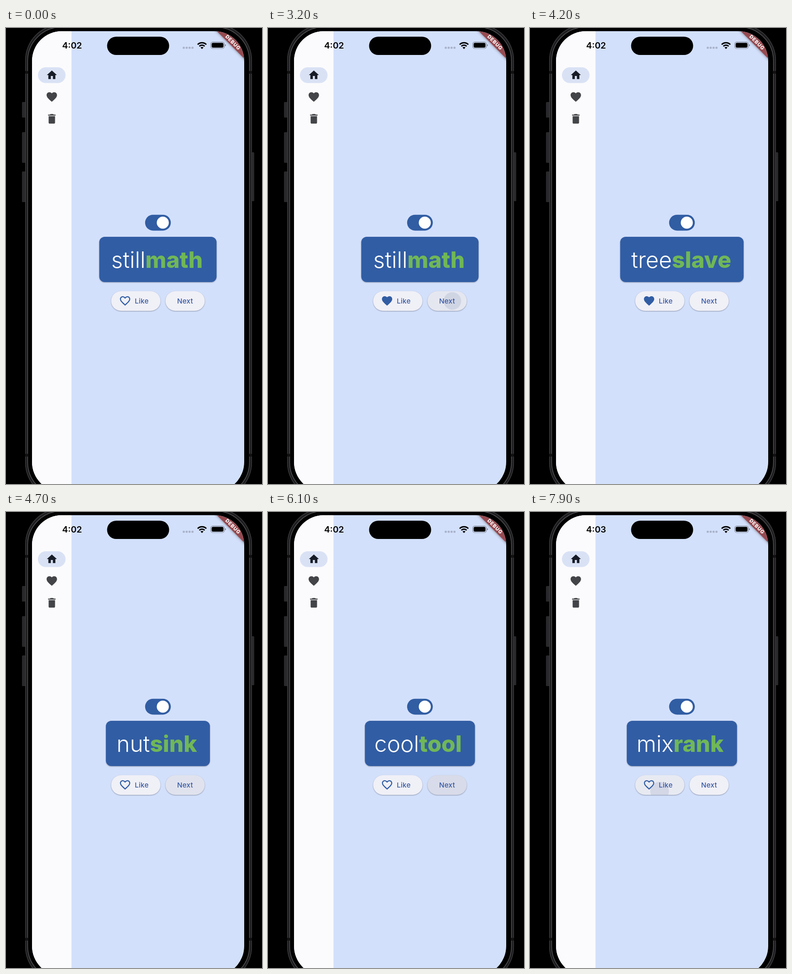
Animation of 561 by 998 pixels, one loop 8 s. Source, as an HTML page:

```html
<!DOCTYPE html>
<html lang="en">
<head>
<meta charset="utf-8">
<title>Word pairs</title>
<style>
html, body { margin: 0; width: 100%; height: 100%; overflow: hidden; background: #000; }
svg { display: block; width: 561px; height: 998px; font-family: Inter, "Liberation Sans", sans-serif; }
.word { font-size: 49.5px; }
.label { font-size: 15.2px; font-weight: 500; letter-spacing: .2px; fill: #3658a5; }
.raised { filter: drop-shadow(0 1.5px 1.3px rgba(40, 45, 60, .42)); }
.rim { fill: none; stroke-width: 1.4; }
</style>
</head>
<body>
<svg viewBox="0 0 561 998">
  <defs>
    <clipPath id="screen"><rect x="57" y="7" width="465" height="1008" rx="65"/></clipPath>
    <clipPath id="cardClip"><rect id="cardMask" y="457" height="99" rx="12"/></clipPath>
    <clipPath id="likeClip"><rect x="230.5" y="576" width="108" height="43" rx="21.5"/></clipPath>
    <clipPath id="nextClip"><rect x="349.5" y="576" width="86" height="43" rx="21.5"/></clipPath>
    <path id="heart" d="M12 21.35l-1.45-1.32C5.4 15.36 2 12.28 2 8.5 2 5.42 4.42 3 7.5 3c1.74 0 3.41.81 4.5 2.09C13.09 3.81 14.76 3 16.5 3 19.58 3 22 5.42 22 8.5c0 3.78-3.4 6.86-8.55 11.54z"/>
  </defs>

  <!-- phone body -->
  <rect width="561" height="998"/>
  <g fill="#29292b">
    <rect x="35" y="162" width="8" height="34" rx="1.5"/>
    <rect x="35" y="228" width="8" height="67" rx="1.5"/>
    <rect x="35" y="314" width="8" height="67" rx="1.5"/>
    <rect x="537" y="272" width="7" height="107" rx="1.5"/>
  </g>
  <rect x="42" y="-8" width="497" height="1038" rx="79" fill="#1d1d1f"/>
  <rect class="rim" x="42.7" y="-7.3" width="495.6" height="1036.6" rx="78" stroke="#3c3c3e"/>
  <rect x="47.5" y="-2" width="486" height="1026" rx="74"/>
  <rect class="rim" x="47.5" y="-2" width="486" height="1026" rx="74" stroke="#565658"/>
  <g fill="#111">
    <rect x="42" y="94" width="6" height="6"/><rect x="533" y="94" width="6" height="6"/>
    <rect x="42" y="932" width="6" height="6"/><rect x="533" y="932" width="6" height="6"/>
  </g>

  <g clip-path="url(#screen)">
    <rect x="57" y="7" width="465" height="991" fill="#d3e0fb"/>
    <rect x="57" y="7" width="86.5" height="991" fill="#fbfbfd"/>

    <!-- navigation rail -->
    <rect x="70" y="86" width="60.5" height="34.5" rx="17.2" fill="#d9e2f5"/>
    <path transform="translate(87.3 89.7) scale(1.1)" fill="#171c26" d="M10 20v-6h4v6h5v-8h3L12 3 2 12h3v8z"/>
    <use href="#heart" transform="translate(86.7 137.2) scale(1.14)" fill="#434447"/>
    <path transform="translate(86.4 184.8) scale(1.17)" fill="#434447" d="M6 19c0 1.1.9 2 2 2h8c1.1 0 2-.9 2-2V7H6v12zM19 4h-3.5l-1-1h-5l-1 1H5v2h14V4z"/>

    <!-- status bar -->
    <text id="clock" x="123" y="45.3" font-size="19.2" font-weight="600"></text>
    <rect x="221.5" y="19" width="136" height="40" rx="20"/>
    <g fill="#a9b3ca">
      <rect x="387.2" y="41" width="4.6" height="4.6" rx="1.5"/>
      <rect x="393.6" y="41" width="4.6" height="4.6" rx="1.5"/>
      <rect x="400" y="41" width="4.6" height="4.6" rx="1.5"/>
      <rect x="406.4" y="41" width="4.6" height="4.6" rx="1.5"/>
    </g>
    <g fill="none" stroke="#000" stroke-width="3">
      <path d="M420 36.2a13.3 13.3 0 0 1 19 0"/>
      <path d="M423.7 40a8 8 0 0 1 11.6 0"/>
    </g>
    <path d="M429.5 46l-3.2-3.3a4.6 4.6 0 0 1 6.4 0z"/>
    <rect x="448.6" y="30.6" width="30" height="14.4" rx="4.6" fill="none" stroke="#7c8494" stroke-width="1.2"/>
    <rect x="450.6" y="32.6" width="26" height="10.4" rx="2.9"/>
    <path d="M480 35.5q2 .5 2 2.3t-2 2.3z" fill="#7c8494"/>

    <!-- corner banner -->
    <g transform="translate(497.5 31.5) rotate(45)">
      <rect x="-60" y="-7.8" width="120" height="15.6" fill="#964a50" style="filter:drop-shadow(0 0 3px rgba(0,0,0,.45))"/>
      <text y="3.9" text-anchor="middle" font-size="10.8" font-weight="800" letter-spacing=".9" fill="#fff">DEBUG</text>
    </g>

    <!-- switch -->
    <rect x="304.8" y="408.8" width="56.4" height="34.6" rx="17.3" fill="#315da3"/>
    <circle cx="343.6" cy="426" r="13.2" fill="#fffffd"/>

    <!-- word card -->
    <rect id="card" class="raised" y="457" height="99" rx="12" fill="#315da4"/>
    <g class="word" clip-path="url(#cardClip)">
      <text id="first" y="524.5" text-anchor="end" font-weight="300" fill="#fff"></text>
      <text id="second" y="524.5" font-weight="800" fill="#70b757"></text>
    </g>

    <!-- buttons -->
    <rect class="raised" x="230.5" y="576" width="108" height="43" rx="21.5" fill="#f0f0f7"/>
    <rect class="raised" x="349.5" y="576" width="86" height="43" rx="21.5" fill="#f0f0f7"/>
    <g clip-path="url(#likeClip)" fill="#2c4a84">
      <rect id="likeGlow" x="230" y="575" width="109" height="45"/>
      <circle id="likeRipple"/>
    </g>
    <g clip-path="url(#nextClip)" fill="#2c4a84">
      <rect id="nextGlow" x="349" y="575" width="87" height="45"/>
      <circle id="nextRipple"/>
    </g>
    <g transform="translate(247.4 583.6) scale(1.13)" fill="#315da4">
      <use id="liked" href="#heart"/>
      <path id="unliked" d="M16.5 3c-1.74 0-3.41.81-4.5 2.09C10.91 3.81 9.24 3 7.5 3 4.42 3 2 5.42 2 8.5c0 3.78 3.4 6.86 8.55 11.54L12 21.35l1.45-1.32C18.6 15.36 22 12.28 22 8.5 22 5.42 19.58 3 16.5 3zm-4.4 15.55l-.1.1-.1-.1C7.14 14.24 4 11.39 4 8.5 4 6.5 5.5 5 7.5 5c1.54 0 3.04.99 3.57 2.36h1.87C13.46 5.99 14.96 5 16.5 5c2 0 3.5 1.5 3.5 3.5 0 2.89-3.14 5.74-7.9 10.05z"/>
    </g>
    <text class="label" x="282.3" y="603">Like</text>
    <text class="label" x="375" y="603">Next</text>
  </g>
</svg>
<script>
const LOOP = 8000, CLOCK_TICK = 7100, MID = 332.9;
const $ = id => document.getElementById(id);
const clamp = x => Math.max(0, Math.min(1, x));

// first word, second word, x where they meet, card width
const pairs = [
  ['still', 'math', 305.6, 257],
  ['tree', 'slave', 311, 270.5],
  ['nut', 'sink', 315.4, 228],
  ['cool', 'tool', 331, 242.5],
  ['mix', 'rank', 314.6, 241.5]
];

const buttons = {
  like: { tap: [284, 612], mid: [284.5, 597.5], reach: 58 },
  next: { tap: [406, 597.5], mid: [392.5, 597.5], reach: 48 }
};

// button, finger down, finger up
const taps = [
  ['like', 2195, 2350], ['next', 3060, 3230],
  ['like', 3600, 3760], ['next', 4260, 4430],
  ['like', 5070, 5230], ['next', 5760, 5920],
  ['like', 6430, 6600], ['next', 7360, 7500],
  ['like', 7805, 8000]
];

function set(id, attrs) {
  for (const k in attrs) $(id).setAttribute(k, attrs[k]);
}

function ease(x) {
  const s = 1 - Math.pow(1 - clamp(x), 1.8);
  return s * s * (3 - 2 * s);
}

function drawInk(name, t) {
  const b = buttons[name];
  const tap = taps.find(([n, down, up]) => n === name && t >= down && t < up + 375);
  if (!tap) {
    set(name + 'Glow', { opacity: 0 });
    set(name + 'Ripple', { r: 0 });
    return;
  }
  const [, down, up] = tap;
  const since = Math.max(0, t - up);
  const grow = ease((Math.min(t, up) - down) / 1000 + since / 225);
  const glow = clamp((t - down) / 200) * (1 - clamp(since / 200));
  const ink = clamp((t - down) / 75) * (1 - clamp((since - 225) / 150));
  set(name + 'Glow', { opacity: 0.08 * glow });
  set(name + 'Ripple', {
    cx: b.tap[0] + (b.mid[0] - b.tap[0]) * grow,
    cy: b.tap[1] + (b.mid[1] - b.tap[1]) * grow,
    r: b.reach * (0.3 + 0.7 * grow),
    opacity: 0.115 * ink
  });
}

function draw(t) {
  let word = 0, liked = false, changed = -LOOP;
  for (const [name, , up] of taps) {
    if (t < up) break;
    if (name === 'like') liked = !liked;
    else { word++; liked = false; changed = up; }
  }
  const [first, second, seam, width] = pairs[word];
  const from = word ? pairs[word - 1][3] : width;
  const w = from + (width - from) * clamp((t - changed) / 200);
  for (const id of ['card', 'cardMask']) set(id, { x: MID - w / 2, width: w });

  $('first').textContent = first;
  $('second').textContent = second;
  set('first', { x: seam });
  set('second', { x: seam });
  $('clock').textContent = t < CLOCK_TICK ? '4:02' : '4:03';
  set('liked', { opacity: liked ? 1 : 0 });
  set('unliked', { opacity: liked ? 0 : 1 });
  drawInk('like', t);
  drawInk('next', t);
}

const start = performance.now();
function tick() {
  draw((performance.now() - start) % LOOP);
  requestAnimationFrame(tick);
}
tick();
</script>
</body>
</html>
```
